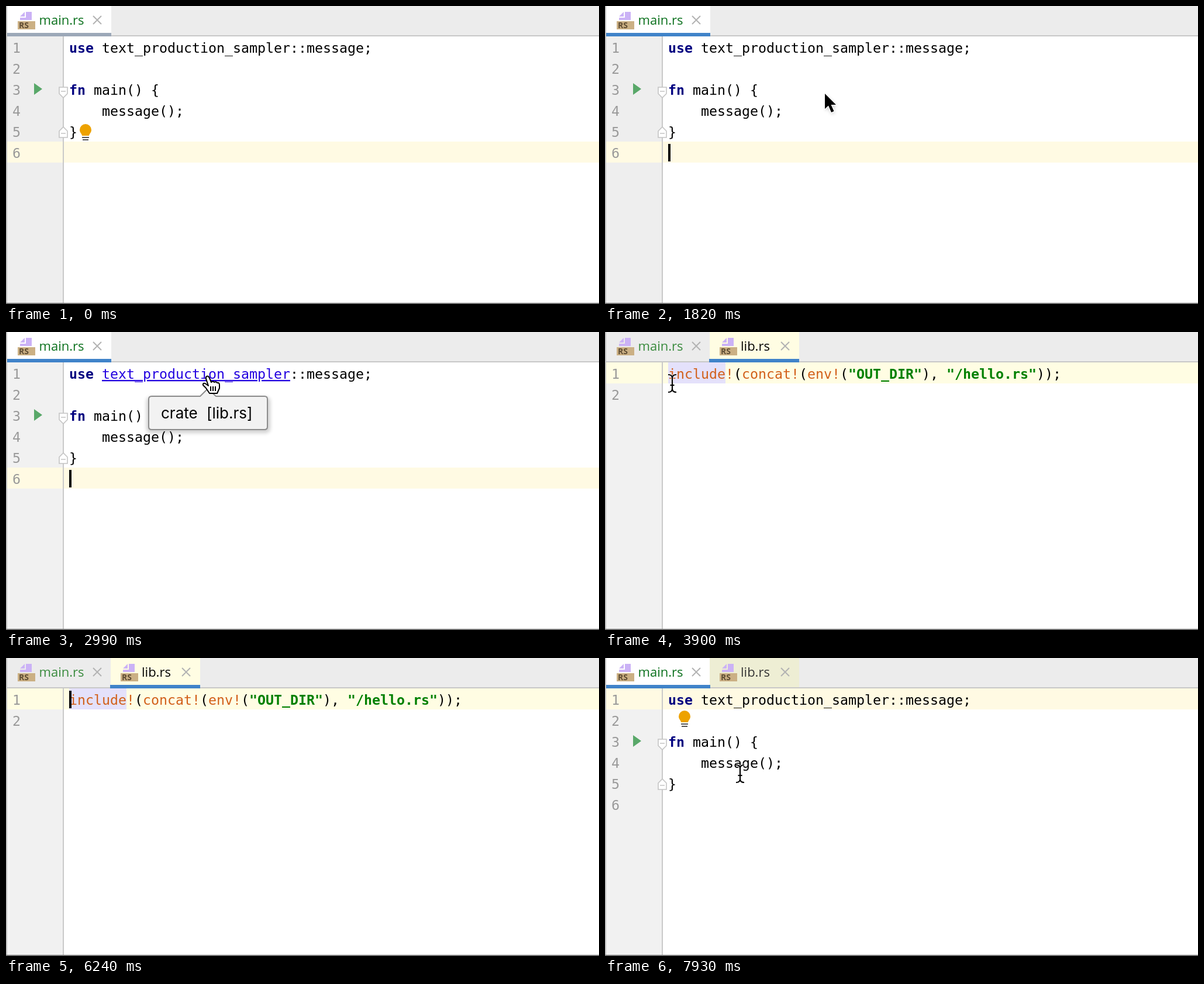
Animation, 1014 px wide and 510 px high, one loop 8 s. Source, as an HTML page:

```html
<!DOCTYPE html>
<html lang="en">
<head>
<meta charset="utf-8">
<title>Editor navigation</title>
<style>
html, body { margin: 0; width: 100%; height: 100%; overflow: hidden; background: #fff; }
svg { display: block; width: 1014px; height: 510px; }
text { white-space: pre; }
.code { font: 23.25px "DejaVu Sans Mono", monospace; }
.tab { font: 22px "Open Sans", sans-serif; }
.tip { font: 26px Inter, sans-serif; }
.num { fill: #999; }
.kw { font-weight: bold; fill: #000080; }
.str { font-weight: bold; fill: #008000; }
.mac { fill: #d2601a; }
.link { fill: #2200e0; text-decoration: underline; }
</style>
</head>
<body>
<svg viewBox="0 0 1014 510">
  <defs>
    <g id="file">
      <path d="M24 18L32 10V18ZM34 10H44V24H24V20H34Z" fill="#cbb2f6"/>
      <path d="M20 26H50V40H20Z" fill="#cbb084"/>
      <text x="22" y="38" font-family="Open Sans, sans-serif" font-size="14" font-weight="bold" fill="#5e4c33">RS</text>
    </g>
    <path id="close" d="M149 17L163 31M163 17L149 31" stroke="#b3b3b3" stroke-width="2"/>
    <filter id="blur" x="-20%" y="-40%" width="140%" height="180%"><feGaussianBlur stdDeviation="3"/></filter>
  </defs>

  <rect width="1014" height="52" fill="#ececec"/>
  <rect y="50" width="1014" height="2" fill="#c8c8c8"/>
  <rect id="gutter" y="52" width="98" height="458"/>
  <rect id="row" x="2" width="1012" height="36"/>
  <path d="M98 52V510" stroke="#c9c9c9" stroke-width="2"/>

  <rect id="mainTab" x="2" width="178" height="50" fill="#fff"/>
  <g id="libTab">
    <rect id="libBack" x="179" width="153" height="50"/>
    <use href="#file" x="176"/>
    <text id="libName" class="tab" x="232" y="32">lib.rs</text>
    <use href="#close" x="152"/>
  </g>
  <use href="#file"/>
  <text id="mainName" class="tab" x="56.500" y="32">main.rs</text>
  <use href="#close"/>
  <rect id="underline" y="46" height="6"/>

  <g id="mainCode">
    <g id="mainText"></g>
    <path d="M48 132L62 142L48 152Z" fill="#59a869"/>
    <g fill="#fff" stroke="#c4c4c4" stroke-width="1.600">
      <path d="M91 139H105V150L98 157L91 150ZM94 146H102"/>
      <path d="M91 225H105V214L98 207L91 214ZM94 218H102"/>
    </g>
  </g>
  <g id="libCode">
    <rect x="108" y="52" width="98" height="36" fill="#e4e1fb"/>
    <g id="libText"></g>
  </g>

  <g id="bulb">
    <path d="M130 222C130 219 126 217 126 212A10 10 0 0 1 146 212C146 217 142 219 142 222Z" fill="#eda200"/>
    <path d="M130 225H142M131 229H141" stroke="#555" stroke-width="2"/>
  </g>
  <rect id="caret" width="4" height="30"/>

  <g id="tip">
    <rect x="240" y="111" width="212" height="62" rx="8" fill="#000" opacity=".18" filter="url(#blur)"/>
    <path d="M249 110H332L345 97L359 110H442Q447 110 447 115V162Q447 167 442 167H249Q244 167 244 162V115Q244 110 249 110Z" fill="#f2f2f2" stroke="#8c8c8c" stroke-width="2"/>
    <text class="tip" x="265" y="148" font-weight="bold">crate</text>
    <text class="tip" x="343" y="148">[lib.rs]</text>
  </g>

  <g id="arrow">
    <path d="M0 0V26L6 20.500L11 32L15.500 30L10.500 19H19Z" transform="translate(1 3)" opacity=".25" filter="url(#blur)"/>
    <path d="M0 0V26L6 20.500L11 32L15.500 30L10.500 19H19Z" stroke="#fff" stroke-width="2.500" paint-order="stroke"/>
  </g>
  <g id="hand" fill="#fff" stroke="#000" stroke-width="2" stroke-linejoin="round">
    <path d="M-3 1C-1 -2 2 0 3 3L6 10Q9 7 11 10Q14 8 16 11Q20 10 20 15V20L16 29H3L-3 20L-8 15C-9 11 -5 11 -3 13L1 16L-3 4Z"/>
    <path d="M5 17V25M9 17V25M13 17V25" fill="none"/>
  </g>
  <g id="beam" fill="none">
    <path id="beamLine" d="M-7 -15Q0 -15 0 -9Q0 -15 7 -15M0 -9V9M-7 15Q0 15 0 9Q0 15 7 15M-3.500 3H3.500" stroke="#fff" stroke-width="4" opacity=".8"/>
    <path d="M-7 -15Q0 -15 0 -9Q0 -15 7 -15M0 -9V9M-7 15Q0 15 0 9Q0 15 7 15M-3.500 3H3.500" stroke="#000" stroke-width="2.200"/>
  </g>

  <path d="M1 0V510" stroke="#bdbdbd" stroke-width="2"/>
  <path d="M0 509H1014" stroke="#767676" stroke-width="2"/>
</svg>
<script>
const $ = id => document.getElementById(id);
const show = (id, on) => $(id).setAttribute("visibility", on ? "visible" : "hidden");
const set = (id, attrs) => { for (const k in attrs) $(id).setAttribute(k, attrs[k]); };
const span = (cls, text) => `<tspan class="${cls}">${text}</tspan>`;
const LOOP = 8000, STEP = 130;
const FOCUS = 1300, LINK = 2340, TIP = 2470, OPEN = 3250, BACK = 6500, HINT = 7540;

function fill(id, lines) {
  $(id).innerHTML = lines.map((line, i) => {
    const y = 80 + 36 * i;
    return `<text class="code num" x="11" y="${y}">${i + 1}</text><text class="code" x="108" y="${y}">${line}</text>`;
  }).join("");
}
fill("mainText", [
  span("kw", "use") + ' <tspan id="crate">text_production_sampler</tspan>::message;',
  "",
  span("kw", "fn") + " main() {",
  "    message();",
  "}",
  ""
]);
fill("libText", [
  span("mac", "include!") + "(" + span("mac", "concat!") + "(" + span("mac", "env!") + "(" +
    span("str", '"OUT_DIR"') + "), " + span("str", '"/hello.rs"') + "));",
  ""
]);

// Pointer tracks: kind, then [time, x, y] points; hidden outside its span.
const tracks = [
  ["arrow", [1040, 748, 480], [1300, 590, 340], [1560, 430, 200], [1820, 376, 150], [1950, 376, 150], [2340, 345, 76]],
  ["hand", [2340, 345, 76], [3250, 345, 76]],
  ["beam", [3250, 345, 84], [3380, 345, 84], [3770, 115, 88], [4680, 115, 88], [5070, 440, 120],
    [5330, 625, 178], [5460, 650, 230], [5850, 670, 400], [6240, 670, 400]],
  ["beam", [7280, 420, 490], [7540, 310, 310], [7800, 231, 198], [8000, 231, 198]]
];
const caretOn = [[1300, 2080], [2600, 3120], [3250, 3640], [4160, 4680], [5200, 5720], [6240, 7020], [7410, 7900]];

function locate(points, t) {
  const i = points.findIndex(p => p[0] > t);
  const [t0, x0, y0] = points[i - 1], [t1, x1, y1] = points[i];
  const k = (t - t0) / (t1 - t0);
  return [x0 + (x1 - x0) * k, y0 + (y1 - y0) * k];
}

function draw(t) {
  const lib = t >= OPEN && t < BACK, first = t < OPEN;
  show("mainCode", !lib);
  show("libCode", lib);
  show("libTab", !first);
  set("mainTab", { fill: lib ? "#ececec" : "#fff" });
  set("mainName", { fill: lib ? "#388a3c" : "#0a701c" });
  set("libBack", { fill: lib ? "#fffde3" : "#eeeed4" });
  set("libName", { fill: lib ? "#000" : "#333" });
  set("underline", { x: lib ? 178 : 2, width: lib ? 154 : 178, fill: t < FOCUS ? "#9ca8b8" : "#4083c9" });
  set("gutter", { fill: t < 1950 ? "#eee" : "#f1f1f1" });
  set("row", { y: first ? 232 : 52, fill: lib ? "#fffde3" : "#fffae3" });

  show("caret", caretOn.some(([a, b]) => t >= a && t < b));
  set("caret", { x: t >= BACK ? 345 : 108, y: first ? 236 : 56 });
  show("bulb", t < FOCUS || t >= HINT);
  set("bulb", { transform: `translate(0 ${first ? 0 : -112})` });
  set("crate", { class: t >= LINK && first ? "link" : "" });
  show("tip", t >= TIP && first);

  for (const kind of ["arrow", "hand", "beam"]) show(kind, false);
  for (const [kind, ...points] of tracks) {
    if (t < points[0][0] || t >= points.at(-1)[0]) continue;
    show(kind, true);
    set(kind, { transform: `translate(${locate(points, t)})` });
  }
}

function tick() {
  const t = performance.now() % LOOP;
  draw(Math.floor(t / STEP) * STEP);
  requestAnimationFrame(tick);
}
tick();
</script>
</body>
</html>
```
